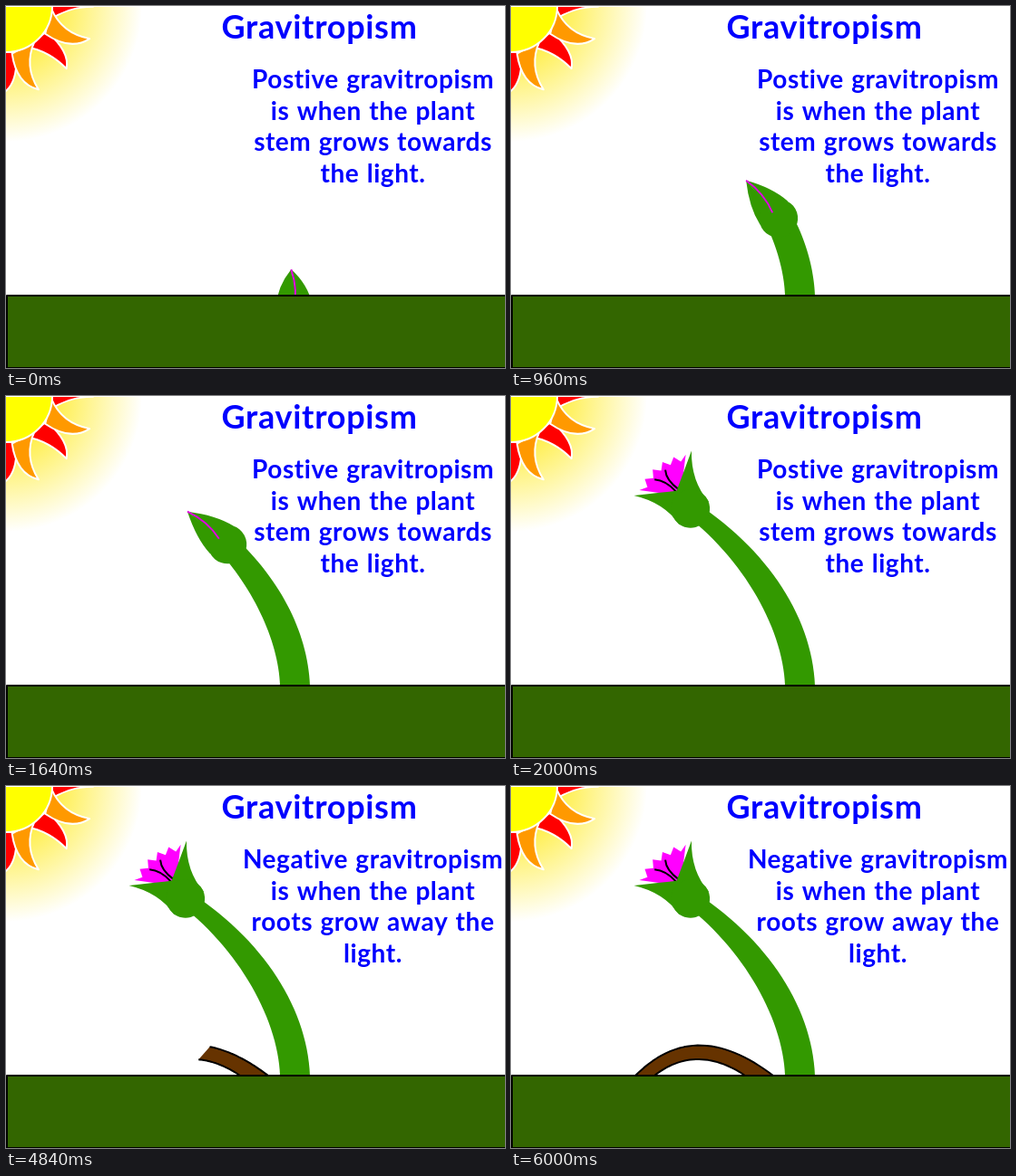
Write an HTML page with a canvas that moves like this. It is 550 px wide and 400 px high and loops after 8000 ms.

```html
<!DOCTYPE html>
<html lang="en">
<head>
<meta charset="utf-8">
<title>Gravitropism</title>
<style>
html, body { margin: 0; width: 100%; height: 100%; overflow: hidden; background: #fff; }
canvas { display: block; }
</style>
</head>
<body>
<canvas id="stage" width="550" height="400"></canvas>
<script>
const ctx = document.getElementById('stage').getContext('2d');
const LOOP = 8000, STEP = 40, ROOT_START = 4000;
const GREEN = '#339900', MAGENTA = '#ff00ff';

const lerp = (a, b, p) => a + (b - a) * p;
const clamp = v => Math.max(0, Math.min(1, v));
const rad = degrees => degrees * Math.PI / 180;
const polar = (r, degrees) => [r * Math.cos(rad(degrees)), r * Math.sin(rad(degrees))];

function cubic([a, b, c, d], t) {
  const s = 1 - t;
  return [0, 1].map(k =>
    s * s * s * a[k] + 3 * s * s * t * b[k] + 3 * s * t * t * c[k] + t * t * t * d[k]);
}

function sample(curve, end) {
  const count = 30;
  return Array.from({ length: count + 1 }, (_, i) => cubic(curve, end * i / count));
}

function trace(points) {
  ctx.beginPath();
  points.forEach(p => ctx.lineTo(...p));
}

// Quadratic segments: a start point, then control and end points in turn.
function curve(start, ...points) {
  ctx.beginPath();
  ctx.moveTo(...start);
  for (let i = 0; i < points.length; i += 2) ctx.quadraticCurveTo(...points[i], ...points[i + 1]);
}

function fill(color) { ctx.fillStyle = color; ctx.fill(); }

function stroke(color, width) {
  ctx.strokeStyle = color;
  ctx.lineWidth = width;
  ctx.stroke();
}

function disc(x, y, r, color) {
  ctx.beginPath();
  ctx.arc(x, y, r, 0, Math.PI * 2);
  fill(color);
}

// Sun
function ray(degrees, length, side, hollow, bulge, color) {
  const at = (r, a) => polar(r, degrees + side * a);
  curve(at(50, -18), at(69, hollow), at(length, 0), at(87, bulge), at(53, 14));
  ctx.closePath();
  fill(color);
  stroke('#fff', 2);
}

function drawSun() {
  const glow = ctx.createRadialGradient(0, 0, 0, 0, 0, 150);
  glow.addColorStop(0.34, '#ffee44');
  glow.addColorStop(1, '#ffffff');
  disc(0, 0, 150, glow);
  for (let i = 0; i < 3; i++) ray(0.5 + 45.6 * i, 96, -1, 0, 10.5, '#ff0000');
  for (let i = 0; i < 2; i++) ray(21.4 + 47.4 * i, 99, 1, 5, 13.6, '#ff9900');
  disc(0, 0, 51, '#ffff00');
  stroke('#fff', 2);
  ctx.fillStyle = '#fff';
  ctx.fillRect(0, 0, 550, 1);
}

// Text
function write(lines, x, y, size, spacing) {
  ctx.font = `bold ${size}px Lato, "Open Sans", sans-serif`;
  ctx.letterSpacing = spacing + 'px';
  ctx.wordSpacing = '1px';
  ctx.textAlign = 'center';
  ctx.fillStyle = '#0000ff';
  lines.forEach((line, i) => ctx.fillText(line, x, y + i * 34.6));
}

const STEM_TEXT = ['Postive gravitropism', 'is when the plant', 'stem grows towards', 'the light.'];
const ROOT_TEXT = ['Negative gravitropism', 'is when the plant', 'roots grow away the', 'light.'];

// Plant
const STEM_LEFT = [[302, 320], [300, 262], [262, 190], [203, 140]];
const STEM_RIGHT = [[335, 320], [332, 250], [290, 180], [217, 127]];
const GROW_STEPS = 42, OPEN_STEPS = 8;

function drawStem(end) {
  trace([...sample(STEM_LEFT, end), ...sample(STEM_RIGHT, end).reverse()]);
  fill(GREEN);
}

// The head is drawn around the bulb, with x pointing to the tip of the bud.
function drawSepal(side, length, open) {
  ctx.save();
  ctx.scale(1, side);
  ctx.rotate(rad(39 * open));
  curve([8, 20], [30, lerp(17, 0, open)], [length, 0], [38, -9 * open], [16, -1 - 16 * open]);
  ctx.lineTo(0, 0);
  fill(GREEN);
  ctx.restore();
}

function drawPetals(open) {
  const size = lerp(0.7, 1, open), count = 10;
  const edge = Array.from({ length: count + 1 }, (_, i) =>
    polar(size * (i % 2 ? 53 : 60), open * lerp(-32, 33, i / count)));
  trace([[18, 0], ...edge]);
  fill(MAGENTA);
  for (const a of [-13, 5]) {
    curve(polar(51 * size, a * open), polar(41 * size, -3 * open), polar(25, (a / 2 + 4) * open));
    stroke('#000', 2);
  }
}

function drawHead(x, y, grown, open) {
  const bend = Math.sin(grown * Math.PI / 2);
  const length = lerp(48, 57, bend) + 7 * open;
  ctx.save();
  ctx.translate(x, y);
  ctx.rotate(rad(-90 - lerp(4.5, 50.5, bend) + 12.5 * open));
  if (open > 0) drawPetals(open);
  drawSepal(-1, length, open);
  drawSepal(1, length, open);
  disc(0, 0, 21.3, GREEN);
  if (open === 0) {
    curve([length, 0], [length - 24, 6], [length - 46, -1]);
    stroke('#e000e0', 2);
  }
  ctx.restore();
}

function drawPlant(step) {
  const grown = clamp(step / GROW_STEPS);
  const open = clamp((step - GROW_STEPS) / OPEN_STEPS);
  const reach = lerp(-0.1, 0.837, grown) + 0.223 * open;
  const left = cubic(STEM_LEFT, reach), right = cubic(STEM_RIGHT, reach);
  drawStem(reach);
  drawHead((left[0] + right[0]) / 2, (left[1] + right[1]) / 2, grown, open);
}

// Root
const ROOT_OUTER = [[289, 320], [235, 279], [185, 272], [137, 320]];
const ROOT_INNER = [[258, 320], [224, 297], [190, 295], [158, 320]];
const ROOT_STEPS = 50;

function drawRoot(step) {
  const p = clamp(step / ROOT_STEPS);
  const end = lerp(0.06, 1, p - 0.1 * Math.sin(2 * Math.PI * p));
  const outer = sample(ROOT_OUTER, end);
  const inner = sample(ROOT_INNER, Math.min(1, end * 1.1));
  trace([...outer, ...[...inner].reverse()]);
  fill('#663300');
  [outer, inner].forEach(edge => {
    trace(edge);
    stroke('#000', 2);
  });
}

function drawGround() {
  ctx.beginPath();
  ctx.rect(1, 320, 560, 80);
  fill('#336600');
  stroke('#000', 2);
}

function draw(time) {
  const step = Math.floor(time / STEP);
  const rooting = time >= ROOT_START;
  ctx.fillStyle = '#fff';
  ctx.fillRect(0, 0, 550, 400);
  ctx.lineJoin = 'round';
  drawSun();
  write(['Gravitropism'], 345.5, 36, 36, 0.7);
  write(rooting ? ROOT_TEXT : STEM_TEXT, 404.5, 91, 28, 0.55);
  if (rooting) drawRoot(step - ROOT_START / STEP);
  drawPlant(step);
  drawGround();
}

const start = performance.now();
function tick() {
  draw((performance.now() - start) % LOOP);
  requestAnimationFrame(tick);
}
tick();
</script>
</body>
</html>
```
